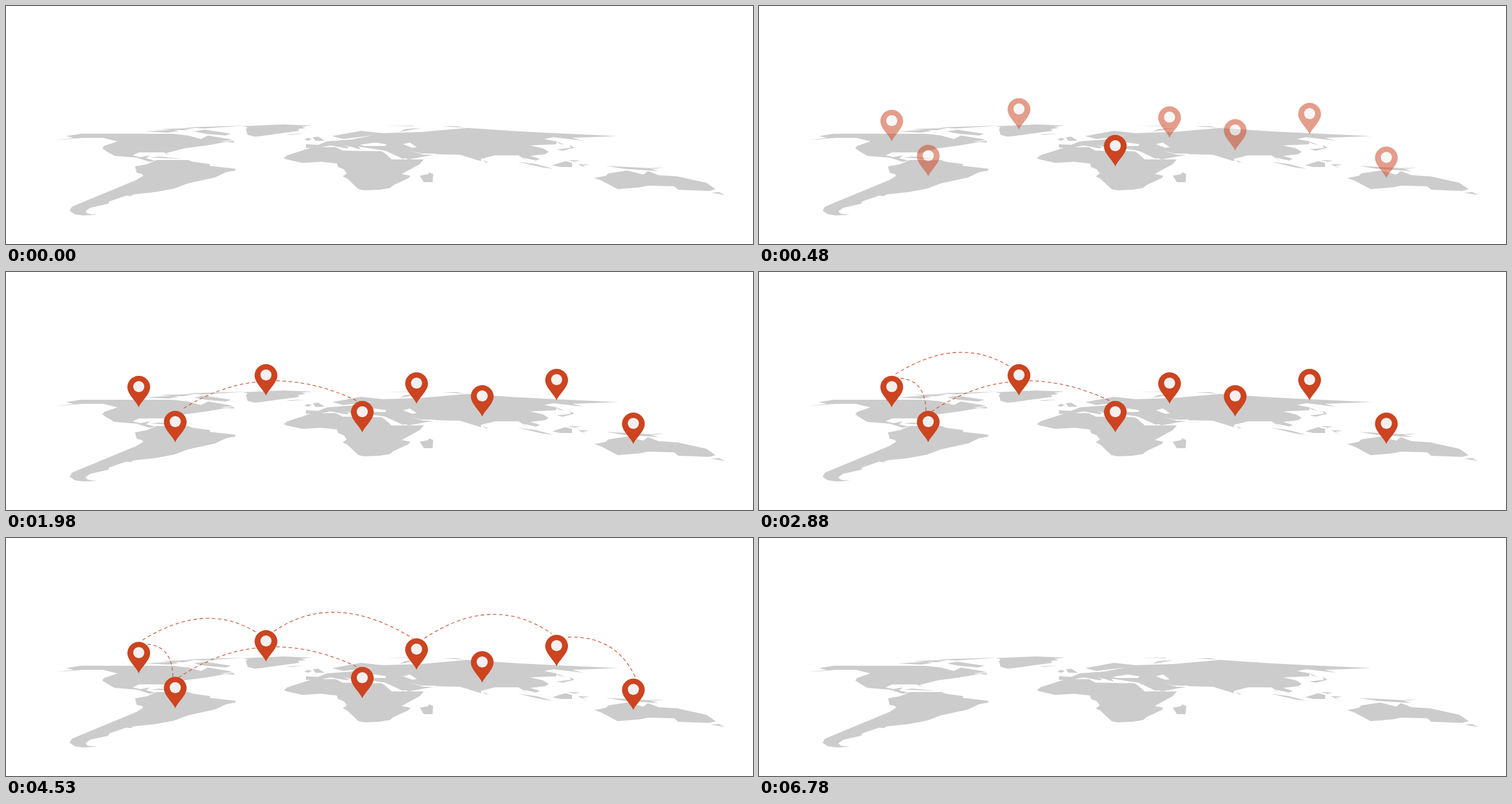
Recreate the animation shown at these times as an HTML page. Size 1280 by 408 pixels, loop 8.55 s.

```html
<!DOCTYPE html>
<html lang="en">
<head>
<meta charset="utf-8">
<title>World map with pins</title>
<style>
  html, body { margin: 0; width: 100%; height: 100%; overflow: hidden; background: #fff; }
  svg { display: block; width: 100vw; height: 100vh; }
  #land { fill: #ccc; }
  #seas { fill: #fff; }
  #arcs { fill: none; stroke: #c9593c; stroke-width: 1.3; stroke-dasharray: 6 4.5; }
</style>
</head>
<body>
<svg viewBox="0 0 1280 408">
  <defs>
    <g id="pin">
      <path fill="#cc4420" d="M0 54C-3 45-19.5 32-19.5 19.5A19.5 19.5 0 0 1 19.5 19.5C19.5 32 3 45 0 54Z"/>
      <circle cy="18.5" r="9.5" fill="#f3f0ef"/>
    </g>
  </defs>
  <g id="land">
    <!-- North America -->
    <path d="M84 230L116 226 103 223 128 219 205 219 285 219 312 222 334 228 346 222 382 228 389 230 367 232 378 233 344 239 306 244 275 252 279 255 270 251 228 251 217 256 230 259 247 256 240 261 256 265 246 267 224 260 186 257 172 249 182 256 165 244 168 240 191 232 166 226 132 226Z"/>
    <!-- Arctic islands and Iceland -->
    <path d="M238 215L286 212 296 214 278 217ZM262 211L324 209 304 213ZM308 208L412 205 338 210ZM322 215L340 212 386 219 376 222 342 219ZM373 233L390 231 391 234ZM248 260L262 258 302 262ZM480 220L512 219 488 221Z"/>
    <!-- Greenland -->
    <path d="M411 211L414 208 406 206 475 203 524 205 506 207 514 209 500 211 503 214 465 219 437 223 426 224 414 221Z"/>
    <!-- South America -->
    <path d="M221 275L242 271 258 264 312 264 320 267 350 271 349 274 393 279 393 282 377 285 358 294 312 304 288 313 256 319 218 323 214 326 206 325 177 335 175 339 144 346 136 352 140 356 156 358 132 359 118 357 109 351 113 344 224 298 235 291 233 288 224 286Z"/>
    <!-- Africa -->
    <path d="M510 247L525 242 565 242 577 248 645 249 661 263 716 263 709 271 678 288 693 291 690 295 664 307 658 312 640 315 614 316 604 314 585 296 577 292 584 287 579 280 569 276 567 270 540 267 508 269 481 263 476 261 482 256ZM709 291L724 288 725 285 732 288 731 302 716 302Z"/>
    <!-- Europe -->
    <path d="M514 243L514 237 535 238 550 232 591 229 628 222 578 228 559 223 608 214 645 218 712 216 712 254 680 262 650 248 604 241 608 246 578 238 588 242 584 244 556 239 536 243ZM511 229L518 226 524 228 518 231ZM526 225L535 224 546 231 530 231Z"/>
    <!-- Asia -->
    <path d="M700 217L790 209 880 215 940 218 1050 223 970 226 989 231 938 225 922 228 943 232 943 237 898 239 920 244 930 250 924 254 898 257 915 262 908 265 886 260 894 266 878 256 838 256 814 262 814 266 807 264 778 255 738 254 690 263 650 248Z"/>
    <!-- Far northern islands -->
    <path d="M674 216L684 211 712 209ZM648 206L698 205 698 206ZM748 206L772 206 786 209ZM872 212L912 213Z"/>
    <!-- East Asian islands -->
    <path d="M817 264L827 268 822 268ZM940 231L958 238 948 236ZM943 246L968 243 966 238 974 243 954 248ZM944 257L958 264ZM962 264L984 265 974 267ZM877 267L908 271 938 279 920 277ZM930 279L970 281ZM936 273L958 266 970 269 970 276 950 276ZM980 271L1000 272 988 274 996 279ZM1028 274L1102 278 1118 283 1058 279ZM1098 278L1128 277 1112 279Z"/>
    <!-- Australia and New Zealand -->
    <path d="M1008 295L1028 291 1032 287 1064 282 1092 289 1100 283 1118 290 1150 292 1200 303 1216 314 1205 317 1152 315 1145 309 1100 308 1085 311 1048 314 1020 299ZM1208 320L1222 319 1232 324Z"/>
  </g>
  <g id="seas">
    <path d="M606 238L632 234 652 237 650 240 614 240ZM680 237L692 234 704 242 696 243ZM690 248L712 253 735 253 738 255 716 255ZM643 249L650 250 665 259 686 263 668 262ZM606 229L634 223Z"/>
  </g>
  <g id="arcs"></g>
  <g id="pins"></g>
</svg>
<script>
const LOOP = 8550, CLEAR = 6780, TICK = 30;

// x and top of each pin; the last one drops in
const pins = [
  [445.5, 158], [943.5, 166], [703.5, 172], [227.5, 178],
  [816, 194], [290, 238], [1075, 241], [610.5, 221]
];

// start, end, then a quadratic curve
const arcs = [
  [1390, 2010, [610, 225], [440, 140], [290, 243]],
  [2220, 2340, [286, 238], [285, 184], [240, 182]],
  [2470, 2860, [234, 175], [343, 107], [431, 163]],
  [3000, 3450, [459, 160], [562, 89], [697, 172]],
  [3615, 3990, [717, 172], [834, 94], [935, 164]],
  [4120, 4440, [963, 170], [1046, 167], [1079, 240]],
  [4590, 5190, [1057, 242], [930, 185], [832, 196]],
  [5310, 5760, [815, 217], [715, 196], [620, 230]]
];

const add = (tag, parent) =>
  document.getElementById(parent).appendChild(
    document.createElementNS("http://www.w3.org/2000/svg", tag));

const pinEls = pins.map(() => {
  const el = add("use", "pins");
  el.setAttribute("href", "#pin");
  return el;
});
const arcEls = arcs.map(() => add("path", "arcs"));

const ramp = (t, a, b) => Math.min(1, Math.max(0, (t - a) / (b - a)));
const mix = (p, q, u) => p.map((v, i) => v + (q[i] - v) * u);

// the first part of a quadratic curve, up to u
function partial(a, b, c, u) {
  const ab = mix(a, b, u), end = mix(ab, mix(b, c, u), u);
  return `M${a}Q${ab} ${end}`;
}

function draw(t) {
  const shown = t >= 90 && t < CLEAR;
  pins.forEach(([x, y], i) => {
    const drops = i === pins.length - 1;
    const p = shown ? ramp(t, 60, drops ? 390 : 870) : 0;
    const lift = drops ? 33 * (1 - p) : 0;
    pinEls[i].setAttribute("opacity", p);
    pinEls[i].setAttribute("transform", `translate(${x} ${y - lift})`);
  });
  arcs.forEach(([from, to, a, b, c], i) => {
    const u = shown ? ramp(t, from, to) : 0;
    arcEls[i].setAttribute("d", u ? partial(a, b, c, u) : "");
  });
}

const start = performance.now();
function frame() {
  const t = (performance.now() - start) % LOOP;
  draw(Math.floor(t / TICK) * TICK);
  requestAnimationFrame(frame);
}
draw(0);
requestAnimationFrame(frame);
</script>
</body>
</html>
```
